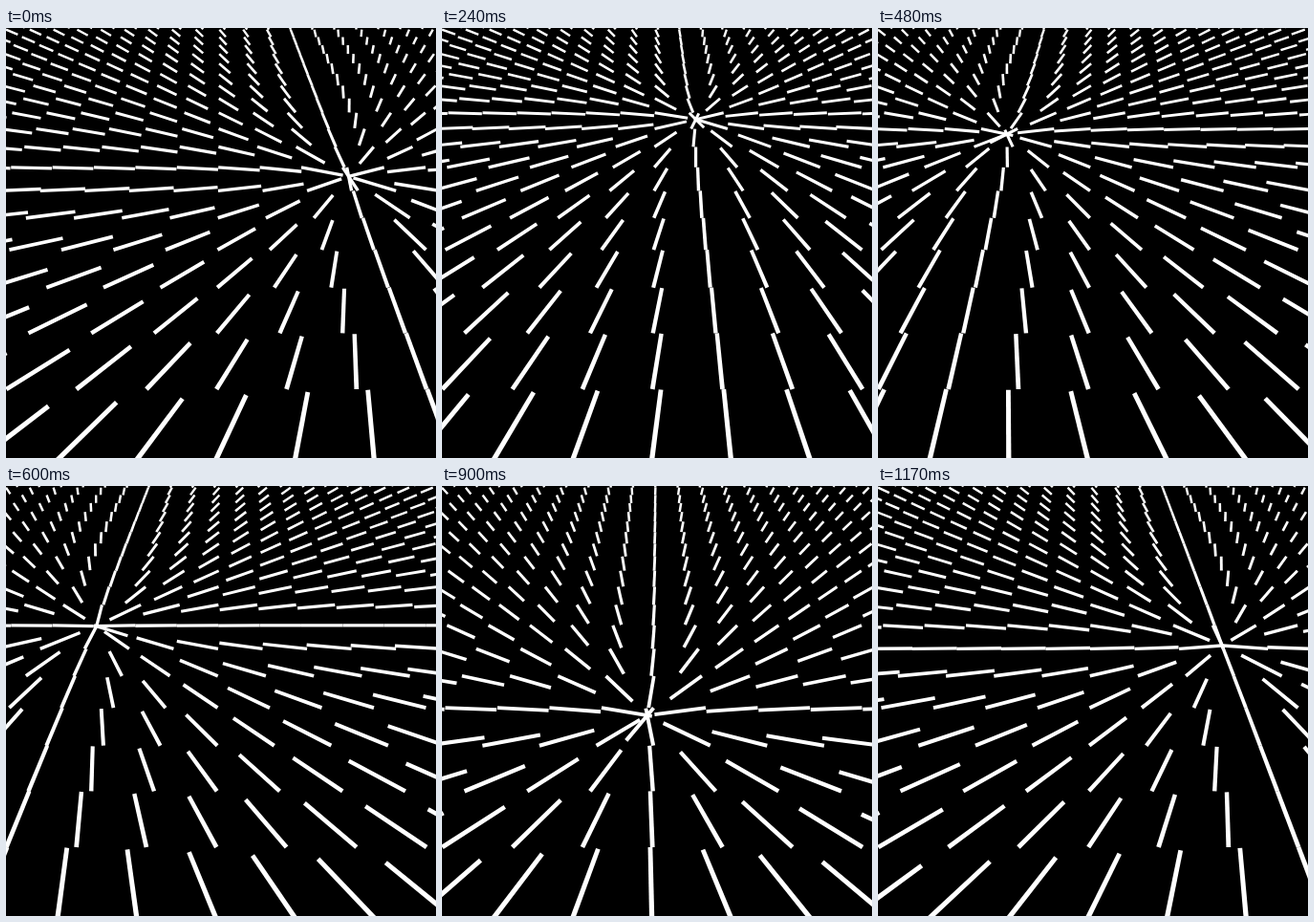
Recreate the animation shown at these times as an HTML page with a canvas. Size 450 px wide and 450 px high, loop 1200 ms.

```html
<!DOCTYPE html>
<html lang="en">
<head>
<meta charset="utf-8">
<title>Compass needles</title>
<style>
  html, body { margin: 0; overflow: hidden; background: #000; }
  canvas { display: block; }
</style>
</head>
<body>
<canvas id="stage" width="450" height="450"></canvas>
<script>
const ctx = document.getElementById('stage').getContext('2d');
const LOOP = 1200, STEP = 30;
const RADIUS = 3, CENTER_V = 5.78, PHASE = -3.5 * Math.PI / 180;
const GRID_SHIFT = -0.065;

// Tilted floor (u to the right, v into the distance) to screen
function project(u, v) {
  const depth = 1 + 0.1149 * v;
  return { x: 225 + 73.3 * u / depth, y: -191 + 569 / depth, half: 0.55 + 1.85 / depth };
}

// Segment that tapers with distance
function needle(a, b) {
  const dx = b.x - a.x, dy = b.y - a.y, len = Math.hypot(dx, dy);
  const nx = -dy / len, ny = dx / len;
  ctx.beginPath();
  ctx.moveTo(a.x + nx * a.half, a.y + ny * a.half);
  ctx.lineTo(b.x + nx * b.half, b.y + ny * b.half);
  ctx.lineTo(b.x - nx * b.half, b.y - ny * b.half);
  ctx.lineTo(a.x - nx * a.half, a.y - ny * a.half);
  ctx.fill();
}

function draw(now) {
  const time = Math.floor(now % LOOP / STEP) * STEP;
  const angle = time / LOOP * 2 * Math.PI + PHASE;
  const focusU = RADIUS * Math.cos(angle);
  const focusV = CENTER_V + RADIUS * Math.sin(angle);

  ctx.fillStyle = '#000';
  ctx.fillRect(0, 0, 450, 450);
  ctx.fillStyle = '#fff';
  for (let v = -2; v <= 20; v++) {
    for (let col = -12; col <= 12; col++) {
      const u = col + GRID_SHIFT;
      const du = focusU - u, dv = focusV - v, dist = Math.hypot(du, dv);
      needle(project(u, v), project(u + du / dist, v + dv / dist));
    }
  }
  requestAnimationFrame(draw);
}

draw(0);
</script>
</body>
</html>
```
